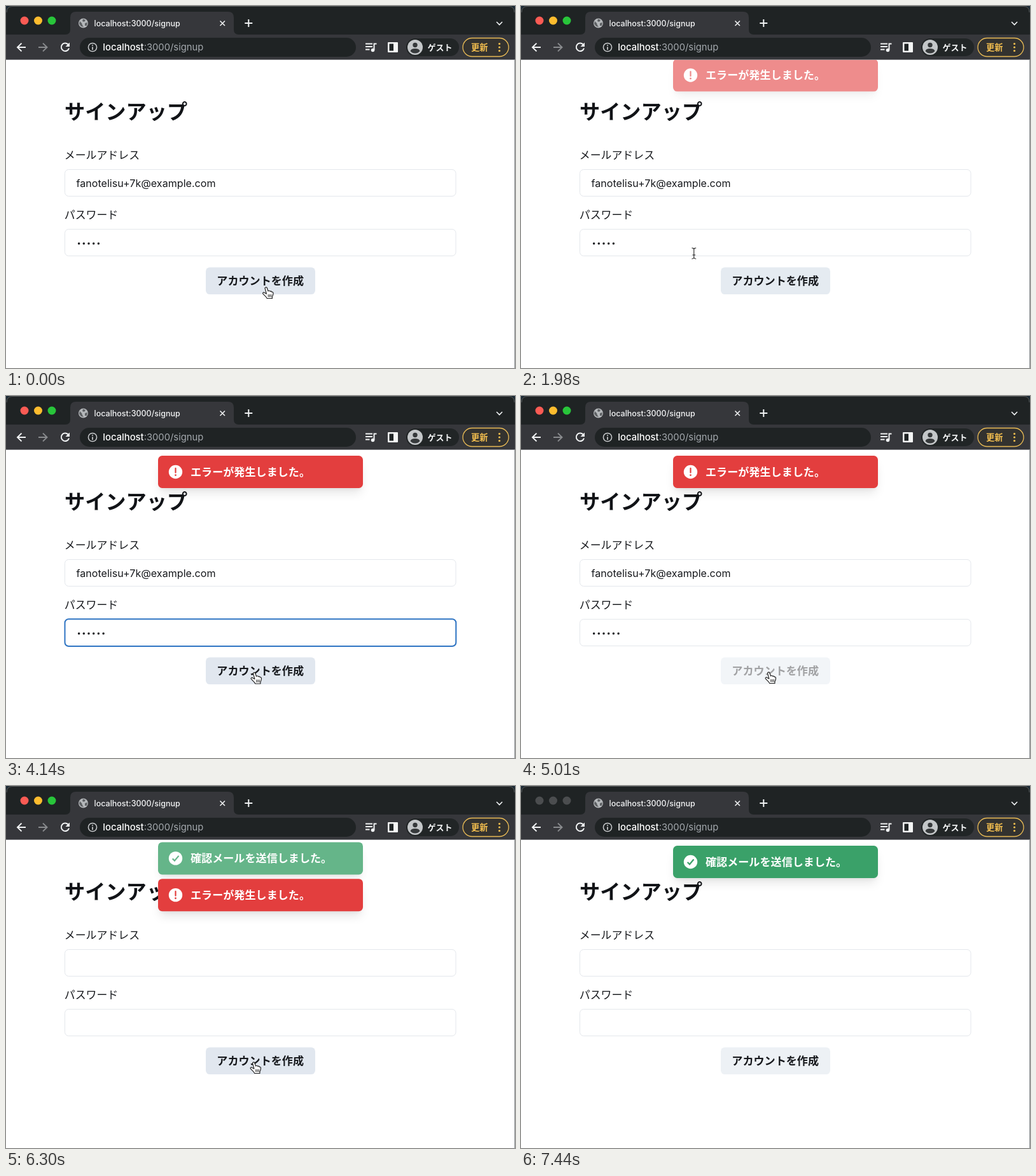
These frames come from a looping animation (800 px wide and 570 px high, 7470 ms). An HTML page:

```html
<!DOCTYPE html>
<html lang="ja">
<head>
<meta charset="utf-8">
<title>サインアップ</title>
<style>
html, body { margin: 0; width: 100%; height: 100%; overflow: hidden; background: #fff; }
#stage { position: absolute; left: 0; top: 0; width: 800px; height: 570px; overflow: hidden; background: #fff; }
svg { position: absolute; left: 0; top: 0; overflow: visible; }
text { font-family: Inter, 'Noto Sans CJK JP', 'Noto Sans CJK', sans-serif; white-space: pre; }
.jp { font-family: 'Noto Sans CJK JP', 'Noto Sans CJK', sans-serif; }
.line { fill: none; stroke: #f1f3f4; stroke-width: 2; }
.thin { stroke-width: 1.6; }
.dim { stroke: #898b8e; }
#view { position: absolute; left: 0; top: 85px; width: 800px; height: 485px; overflow: hidden; }
.toast {
  position: absolute; left: 239px; top: 9px; width: 321.5px; height: 51px; border-radius: 6.5px;
  box-shadow: 0 10.7px 16px -3.2px rgba(0,0,0,.1), 0 4.3px 6.4px -2.1px rgba(0,0,0,.05);
}
.toast text { font-size: 17.1px; font-weight: 600; fill: #fff; }
#error { background: #e33e3e; }
#success { background: #3aa169; }
</style>
</head>
<body>
<div id="stage">
  <svg width="800" height="570">
    <!-- form -->
    <text class="jp" x="92" y="178" font-size="32.2" font-weight="700" fill="#111317">サインアップ</text>
    <g font-size="16.9" font-weight="350" fill="#17191d">
      <text class="jp" x="91.8" y="241.3">メールアドレス</text>
      <text class="jp" x="91.8" y="335.3">パスワード</text>
    </g>
    <g fill="#fff" stroke="#e4e7ec">
      <rect x="92.5" y="257.5" width="614.5" height="42" rx="6"/>
      <rect x="92.5" y="351.5" width="614.5" height="42" rx="6"/>
    </g>
    <rect id="focus" x="92.5" y="351.2" width="614.8" height="42.8" rx="6" fill="none" stroke="#2e74c3" stroke-width="2"/>
    <g id="values" fill="#17191d">
      <text x="110.5" y="284.5" font-size="16.1">fanotelisu+7k@example.com</text>
      <g id="dots"></g>
    </g>
    <rect id="caret" y="363" width="1" height="20" fill="#222"/>
    <g id="button">
      <rect id="face" x="314" y="411.5" width="172" height="42.5" rx="6.4"/>
      <text class="jp" x="331.3" y="438.8" font-size="17.1" font-weight="600" fill="#17191d">アカウントを作成</text>
    </g>
    <path d="M799.5 85V570" stroke="#8d9194"/>

    <!-- browser frame -->
    <rect width="800" height="84" fill="#1b2a35"/>
    <path d="M0 84V10Q0 0 10 0H790Q800 0 800 10V84Z" fill="#1f2324"/>
    <path d="M1 10Q1 .5 10 .5H790Q799 .5 799 10" fill="none" stroke="#55595b"/>
    <path d="M0 45H93Q101 45 101 37V18Q101 9 110 9H349Q358 9 358 18V37Q358 45 366 45H800V84H0Z" fill="#36373b"/>
    <rect y="84" width="800" height="1" fill="#85878a"/>
    <g id="lights"></g>

    <circle cx="121.5" cy="27" r="7.5" fill="#b4b7ba"/>
    <path d="M116 24L119 27L120 30L122 33L118 32L115 28ZM121 20.5L125 22L123 25L120 24ZM124 27L128 26L127 31L124 31Z" fill="#5d6063"/>
    <text x="138.5" y="31.5" font-size="12.5" font-weight="500" fill="#f4f5f6">localhost:3000/signup</text>
    <path class="line thin" d="M336.5 23.5L344 31M344 23.5L336.5 31"/>
    <path class="line" d="M375.3 27H387.300M381.300 21V33"/>
    <path class="line thin" d="M771 25L775.5 29.500L780 25"/>

    <path class="line" d="M31 65H18.5M24.5 58.6L18 65L24.5 71.4"/>
    <path class="line dim" d="M51 65H64M58 58.6L64.5 65L58 71.4"/>
    <path class="line" d="M97.5 60.5A6.200 6.200 0 1 0 99 66.500"/>
    <path d="M100 57.5V64H93.500Z" fill="#f1f3f4"/>
    <rect x="116" y="50" width="434" height="30" rx="15" fill="#1f2324"/>
    <circle cx="136" cy="65" r="6.6" fill="none" stroke="#c8cacc" stroke-width="1.5"/>
    <path d="M136 61V62.700M136 64.200V69" stroke="#c8cacc" stroke-width="1.7"/>
    <text x="152.3" y="70" font-size="14.8" fill="#a3a8ad"><tspan font-weight="500" fill="#fff">localhost</tspan>:3000/signup</text>

    <path class="line" d="M565 59.500H576M565 64H576M565 68.500H571.500M578.500 69V59.500H582.500"/>
    <circle cx="576.5" cy="69.5" r="2.8" fill="#f1f3f4"/>
    <rect x="600" y="57" width="16" height="16" rx="1" fill="#f5f6f6"/>
    <rect x="602.5" y="59.5" width="6.5" height="11" fill="#1f2324"/>
    <rect x="629" y="51" width="83" height="28" rx="14" fill="#212526"/>
    <circle cx="643" cy="65" r="12" fill="#c4c7c9"/>
    <circle cx="643" cy="61.5" r="3.7" fill="#36393b"/>
    <path d="M635.5 71Q636.500 67 643 67T650.500 71Q647.500 74.500 643 74.500T635.500 71Z" fill="#36393b"/>
    <text class="jp" x="662.5" y="69.8" font-size="13" font-weight="600" fill="#f4f5f6">ゲスト</text>
    <rect x="718" y="50.5" width="72" height="29" rx="14.5" fill="#33322f" stroke="#e9bb55" stroke-width="1.3"/>
    <text class="jp" x="731" y="69.8" font-size="13.2" font-weight="600" fill="#f4bf4f">更新</text>
    <g fill="#f4bf4f"><circle cx="775.5" cy="59.5" r="1.6"/><circle cx="775.5" cy="65" r="1.6"/><circle cx="775.5" cy="70.5" r="1.6"/></g>
  </svg>

  <div id="view">
    <div class="toast" id="success">
      <svg width="321" height="51">
        <circle cx="27.5" cy="25.5" r="10.7" fill="#fff"/>
        <path d="M22.7 26L26 29.300L32.500 21.500" fill="none" stroke="#3aa169" stroke-width="2.2"/>
        <text class="jp" x="51" y="31.6">確認メールを送信しました。</text>
      </svg>
    </div>
    <div class="toast" id="error">
      <svg width="321" height="51">
        <circle cx="27.5" cy="25.5" r="10.7" fill="#fff"/>
        <path d="M27.5 19.800V26.600" stroke="#e33e3e" stroke-width="2.2" stroke-linecap="round"/>
        <circle cx="27.5" cy="30.6" r="1.4" fill="#e33e3e"/>
        <text class="jp" x="51" y="31.6">エラーが発生しました。</text>
      </svg>
    </div>
  </div>

  <svg width="800" height="570">
    <g id="cursor" stroke-linejoin="round" stroke-linecap="round">
      <circle id="ring" r="37.5" fill="none" stroke="#000" stroke-opacity=".11"/>
      <g id="hand" fill="#fff" stroke="#222" stroke-width="1.2" transform="translate(-1.2 -1)">
        <path d="M-1.8 1.3C-1.2 -.5 1 -.4 1.5 1L3.2 6C4 4.9 6 5 6.3 6.4C7.3 5.7 8.8 6.2 9 7.4C10.3 7 11.2 7.9 11.2 9.2C11.2 12 10.2 13.5 9.6 15V17.5H1.5C0 14.5 -3 12.5 -5 10C-5.8 8.2 -3.8 7.4 -2.4 8.5L.6 10.2Z"/>
        <path d="M3.5 11.5V15M5.7 11.5V15M7.9 11.5V15" stroke-width="1"/>
      </g>
      <g id="beam" fill="none">
        <path d="M-3 -8.500Q-.3 -8.500 0 -6.500Q.3 -8.500 3 -8.500M0 -7V7M-3 8.500Q-.3 8.500 0 6.500Q.3 8.500 3 8.500M-2 2.500H2" stroke="#222" stroke-width="1.1"/>
      </g>
      <path id="arrow" d="M0 0V15.500L3.600 12.200L6 17.800L8.600 16.700L6.200 11.200H11Z" fill="#111" stroke="#fff" stroke-width="1.2"/>
    </g>
  </svg>
</div>
<script>
const LOOP = 7470;
const $ = id => document.getElementById(id);
const show = (id, on) => { $(id).style.display = on ? '' : 'none'; };
const within = (t, a, b) => t >= a && t < b;

function bezier(x1, y1, x2, y2) {
  const at = (a, b, s) => 3 * a * s * (1 - s) ** 2 + 3 * b * s * s * (1 - s) + s ** 3;
  return p => {
    if (p <= 0 || p >= 1) return p <= 0 ? 0 : 1;
    let lo = 0, hi = 1;
    for (let i = 0; i < 24; i++) {
      const mid = (lo + hi) / 2;
      if (at(x1, x2, mid) < p) lo = mid; else hi = mid;
    }
    return at(y1, y2, lo);
  };
}
const ease = bezier(.25, .1, .25, 1);
const enter = bezier(.4, 0, .2, 1);
const leave = bezier(.4, 0, 1, 1);
const shift = bezier(.4, 0, .1, 1);
const glide = bezier(.4, 0, .5, 1);
const run = (t, start, dur, fn = ease) => fn((t - start) / dur);

// time, x, y of the pointer's hot spot
const PATH = [
  [0, 410, 444], [1480, 410, 444], [1560, 409, 438], [1690, 408, 438],
  [1980, 271.8, 389.5], [2080, 271.8, 389.5], [2500, 264.5, 380.5],
  [3620, 264.5, 380.5], [4060, 391.5, 436.5], [4600, 391.5, 436.5], [4700, 390.5, 436],
  [6930, 390.5, 436], [7260, 350, 590]
];
const PRESSES = [[1410, 1530], [2680, 2800], [4440, 4560]];

function pointer(t) {
  const i = PATH.findIndex(k => k[0] > t);
  if (i < 0) return PATH[PATH.length - 1].slice(1);
  const [a, b] = [PATH[i - 1], PATH[i]];
  const p = run(t, a[0], b[0] - a[0], glide);
  return [a[1] + (b[1] - a[1]) * p, a[2] + (b[2] - a[2]) * p];
}

function circle(parent, cx, cy, r) {
  const c = document.createElementNS('http://www.w3.org/2000/svg', 'circle');
  for (const [k, v] of Object.entries({ cx, cy, r })) c.setAttribute(k, v);
  return parent.appendChild(c);
}
const dots = Array.from({ length: 6 }, (_, i) => circle($('dots'), 114.6 + 7.7 * i, 374, 1.75));
const lights = [29, 50.5, 72].map(x => circle($('lights'), x, 23, 6.5));
const LIGHTS = ['#fb5b54', '#fdbc2e', '#28c53a'];

function drawForm(t) {
  const typed = t >= 3240;
  const focused = within(t, 2690, 4450);
  show('values', t < 6090);
  dots[5].style.display = typed ? '' : 'none';
  $('focus').style.opacity = run(t, 2690, 150) - run(t, 4450, 150);
  const since = t - (typed ? 3240 : 2690);
  show('caret', focused && since % 1000 < 500);
  $('caret').setAttribute('x', typed ? 156.3 : 148.6);

  const hover = 1 - run(t, 1935, 200) + run(t, 3860, 200) - run(t, 7030, 200);
  const mix = (a, b) => a + (b - a) * hover;
  $('face').setAttribute('fill', `rgb(${mix(237, 225)},${mix(241, 231)},${mix(245, 239)})`);
  const busy = run(t, 1530, 150) - run(t, 1800, 150) + run(t, 4560, 200) - run(t, 6120, 200);
  $('button').style.opacity = 1 - .6 * busy;
}

function drawToast(id, opacity, y, scale = 1) {
  const s = $(id).style;
  s.opacity = opacity;
  s.transform = `translateY(${y}px) scale(${scale})`;
}

function drawToasts(t) {
  const inRed = run(t, 1825, 400, enter), out = run(t, 6326, 200, leave);
  const inGreen = run(t, 6099, 400, enter);
  drawToast('error', inRed * (1 - out), 25.7 * (inRed - 1) + 68 * run(t, 6099, 450, shift), 1 - .15 * out);
  drawToast('success', inGreen, 25.7 * (inGreen - 1));
}

function drawCursor(t) {
  const [x, y] = pointer(t);
  const onButton = within(x, 314, 486) && within(y, 411, 454);
  const onField = within(x, 92, 708) && (within(y, 257, 300) || within(y, 351, 394));
  $('cursor').setAttribute('transform', `translate(${x} ${y})`);
  show('cursor', !within(t, 3240, 3620));
  show('hand', onButton);
  show('beam', onField);
  show('arrow', !onButton && !onField);
  show('ring', PRESSES.some(([a, b]) => within(t, a, b)));
}

function render(t) {
  drawForm(t);
  drawToasts(t);
  drawCursor(t);
  lights.forEach((c, i) => c.setAttribute('fill', t < 7350 ? LIGHTS[i] : '#4b4d4f'));
}

const start = performance.now();
function tick() {
  render((performance.now() - start) % LOOP);
  requestAnimationFrame(tick);
}
tick();
</script>
</body>
</html>
```
